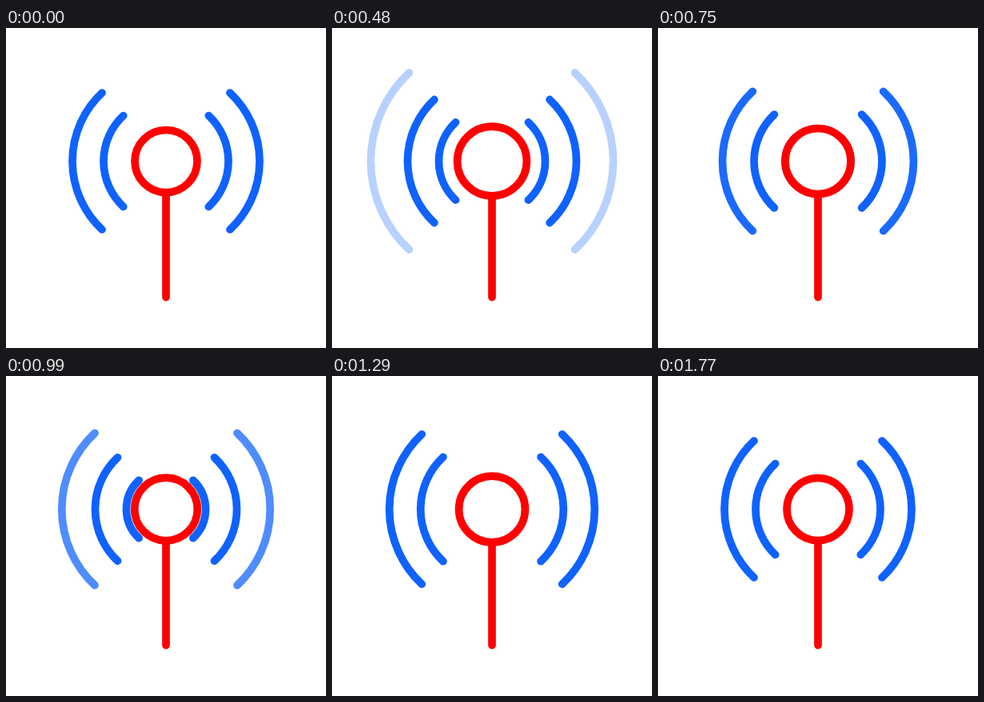
Animation, 400 px wide and 400 px high, one loop 3.03 s. Source, as an HTML page:

```html
<!DOCTYPE html>
<html lang="en">
<head>
<meta charset="utf-8">
<title>Antenna</title>
<style>
  html, body { margin: 0; width: 100%; height: 100%; overflow: hidden; background: #fff; }
  svg { display: block; width: 100%; height: 100%; }
  svg * { fill: none; stroke-width: 9.7; stroke-linecap: round; }
  #waves { stroke: #0f62fe; }
  #mast { stroke: #f00; }
  #mast circle { fill: #fff; }
</style>
</head>
<body>
<svg viewBox="0 0 400 400">
  <g id="waves"></g>
  <g id="mast">
    <line x1="200" x2="200" y2="336.6"/>
    <circle cx="200" cy="166.5"/>
  </g>
</svg>
<script>
const LOOP = 3030, STEP = 30, END = 1770;
const CX = 200, CY = 166.5, GAP = 39, FADE_GAP = 49;
const ANGLE = 46.9 * Math.PI / 180;
const FIRST = -2, LAST = 4;   // wave numbers: two at rest at the start, the last two stay

// Rows of [time in ms, value, slope per ms], joined by cubic Hermite curves.
const launch = [
  [0, 0, .001], [300, .86, .0043], [480, 1.705, .0049], [750, 3.05, .0051],
  [990, 4.27, .0049], [1110, 4.83, .0043], [1320, 5.3, 0]
];
const outerTravel = [...launch, [1620, 5, 0]];
const innerTravel = [...launch, [END, 5, 0]];
const pulse = [
  [0, 0, 0], [300, 1, .014], [480, 4.4, 0], [750, 2, -.009],
  [990, .3, 0], [1290, 2.4, .003], [1380, 2.6, 0], [END, 0, 0]
];

function curve(rows, t) {
  const i = rows.findIndex(row => row[0] > t);
  if (i < 0) return rows[rows.length - 1][1];
  const [t0, v0, s0] = rows[i - 1], [t1, v1, s1] = rows[i];
  const d = t1 - t0, u = (t - t0) / d, w = 1 - u;
  return w * w * (1 + 2 * u) * v0 + u * u * (3 - 2 * u) * v1
    + d * u * w * (w * s0 - u * s1);
}

const wavesGroup = document.getElementById('waves');
const line = document.querySelector('line');
const circle = document.querySelector('circle');
const waves = [];
for (let id = LAST; id >= FIRST; id--) {
  const path = document.createElementNS('http://www.w3.org/2000/svg', 'path');
  wavesGroup.append(path);
  waves.push({ id, path });
}

function arcPair(r) {
  const dx = r * Math.cos(ANGLE), dy = r * Math.sin(ANGLE);
  const side = (sign, sweep) =>
    `M${CX + sign * dx} ${CY - dy}A${r} ${r} 0 0 ${sweep} ${CX + sign * dx} ${CY + dy}`;
  return side(-1, 0) + side(1, 1);
}

function draw(t) {
  for (const { id, path } of waves) {
    const place = curve(id === LAST ? innerTravel : outerTravel, t) - id;
    const beyond = Math.max(0, place - 2);
    const stays = id >= LAST - 1;
    const opacity = stays ? 1 : 1 - beyond;
    const visible = place > 0 && opacity > 0;
    path.style.display = visible ? '' : 'none';
    if (!visible) continue;
    const gap = stays ? GAP : FADE_GAP;
    path.setAttribute('d', arcPair(GAP * (1 + place - beyond) + gap * beyond));
    path.setAttribute('opacity', opacity);
  }
  const r = GAP + curve(pulse, t);
  circle.setAttribute('r', r);
  line.setAttribute('y1', CY + r);
}

const start = performance.now();
function frame() {
  const t = (performance.now() - start) % LOOP;
  draw(Math.min(END, Math.floor(t / STEP) * STEP));
  requestAnimationFrame(frame);
}
frame();
</script>
</body>
</html>
```
